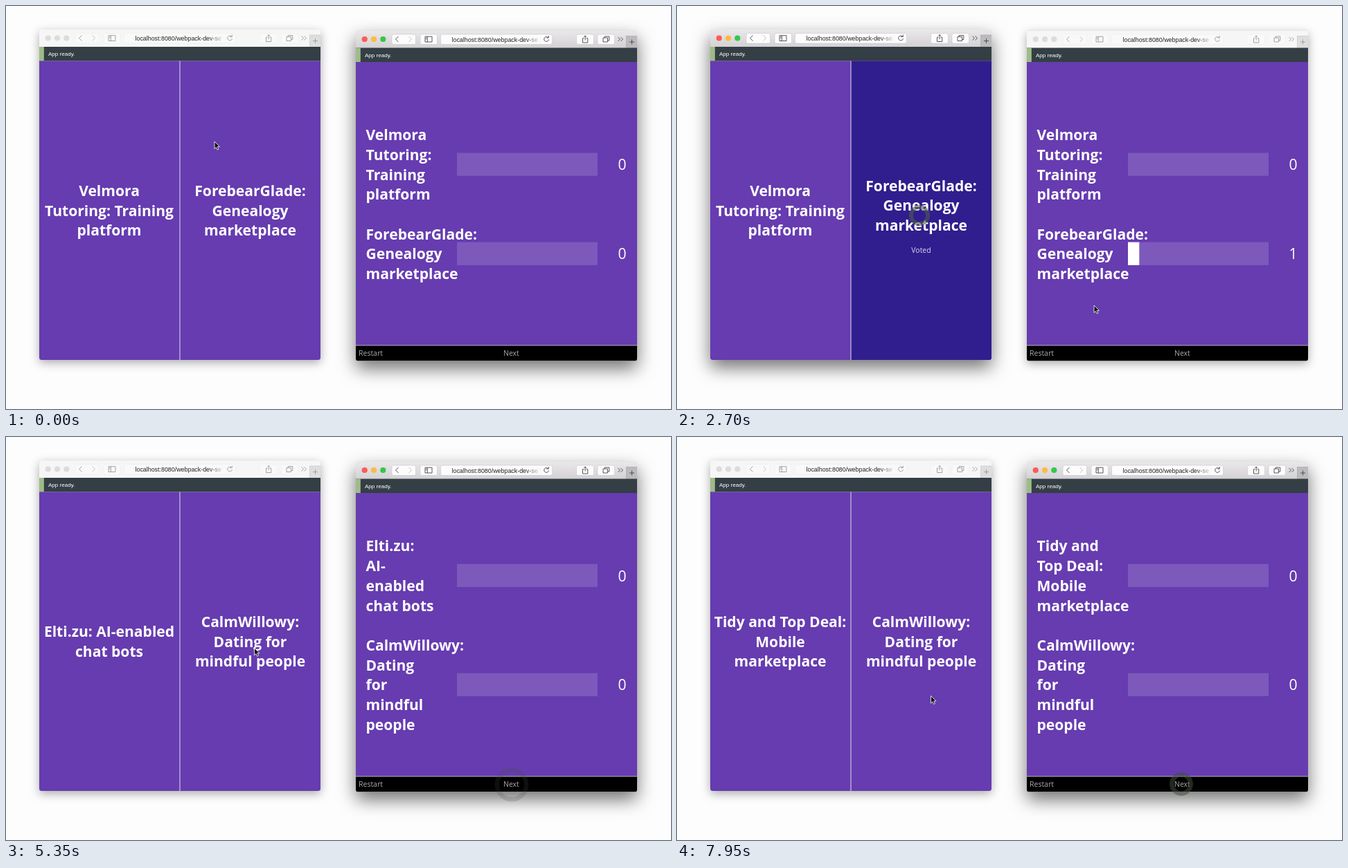
Animation, 960 px wide and 583 px high, one loop 8 s. Source, as an HTML page:

```html
<!DOCTYPE html>
<html lang="en">
<head>
<meta charset="utf-8">
<title>Live voting</title>
<style>
  html, body { margin: 0; width: 100%; height: 100%; overflow: hidden; background: #fefdfe; }
  svg { display: block; width: 100vw; height: 100vh; }
  .frame { filter: drop-shadow(0 4px 7px rgba(0,0,0,.33)); }
  .on .frame { filter: drop-shadow(0 11px 13px rgba(0,0,0,.55)); }
  .bar { fill: #f6f6f6; }
  .on .bar { fill: url(#metal); }
  .button { fill: #f9f9f9; stroke: #efefef; stroke-width: .6; }
  .on .button { fill: #fcfcfc; stroke: #c9c7c9; }
  .icon { fill: none; stroke: #999; stroke-width: .9; }
  .on .icon { stroke: #444; }
  .icon.dim, .on .icon.dim { stroke: #bbb; }
  .light { fill: #dcdcdc; }
  .on .red { fill: #fc5b57; }
  .on .yellow { fill: #fdbc40; }
  .on .green { fill: #34c84a; }
  .tab { fill: #dedede; stroke: #c4c4c4; stroke-width: .6; }
  .on .tab { fill: #bcbabc; stroke: #a5a3a5; }
  .fade { stop-color: #f9f9f9; }
  .small { font: 8.06px "Liberation Sans", Arial, sans-serif; fill: #fff; }
  .url { font: 8.9px "Liberation Sans", Arial, sans-serif; fill: #222; }
  .title { font: 700 21.07px "Open Sans", sans-serif; fill: #fff; }
  .count { font: 400 21.07px "Open Sans", sans-serif; fill: #fff; text-anchor: middle; }
  .note { font: 400 10.5px "Open Sans", sans-serif; fill: #aaa; }
  .center { text-anchor: middle; }
</style>
</head>
<body>
<svg id="stage" viewBox="0 0 960 583">
  <defs>
    <linearGradient id="metal" x2="0" y2="1"><stop stop-color="#eae8ea"/><stop offset="1" stop-color="#d3d1d3"/></linearGradient>
    <linearGradient id="fadeout"><stop class="fade" stop-opacity="0"/><stop class="fade" offset="1"/></linearGradient>
    <clipPath id="corners"><rect width="406" height="478" rx="3.5"/></clipPath>
  </defs>
  <g id="voter" transform="translate(48 34)"></g>
  <g id="board" transform="translate(505 35.5)"></g>
  <circle id="ripple0" fill="none"/><circle id="ripple1" fill="none"/>
  <path id="arrow" d="M0 0V10.6L2.4 8.4L4 12L5.9 11.2L4.3 7.6H7.5Z" fill="#111" stroke="#fff" stroke-width=".8"/>
  <path id="hand" d="M-1 1Q0-.6 1 1V5L5.4 6Q6.6 6.5 6.3 8L5.4 11.5H.4L-2.6 7.3Q-2.6 5.8-1 6.8Z" fill="#fff" stroke="#333" stroke-width=".8"/>
</svg>
<script>
const $ = id => document.getElementById(id);
const LOOP = 8000, LINE = 28.7, BASELINE = 8.1;
const PURPLE = '#663cb0', INDIGO = '#301e8e';

// Each option: lines on the voting card, then lines in the result list.
const tutoring = ['Velmora|Tutoring: Training|platform', 'Velmora|Tutoring:|Training|platform'];
const family = ['ForebearGlade:|Genealogy|marketplace', 'ForebearGlade:|Genealogy|marketplace'];
const bots = ['Elti.zu: AI-enabled|chat bots', 'Elti.zu:|AI-|enabled|chat bots'];
const dating = ['CalmWillowy:|Dating for|mindful people', 'CalmWillowy:|Dating|for|mindful|people'];
const market = ['Tidy and Top Deal:|Mobile|marketplace', 'Tidy and|Top Deal:|Mobile|marketplace'];
const rounds = [[tutoring, family], [bots, dating], [market, dating]];

const clicks = [[2100, 350, 303], [3860, 730, 503], [5560, 358, 308], [7200, 728, 502]];
const path = [
  [0, 301, 196], [1500, 351, 302], [2250, 350, 303], [2700, 602, 433], [3300, 729, 502],
  [4100, 729, 502], [4750, 366, 375], [5250, 358.5, 305], [5700, 358.5, 306],
  [6250, 678.5, 472.5], [6700, 728, 502], [7300, 728, 502], [7950, 366.5, 374.5], [8000, 365, 368]
];

const rect = (x, y, w, h, fill) => `<rect x="${x}" y="${y}" width="${w}" height="${h}" fill="${fill}"/>`;
const text = (x, y, cls, s) => `<text x="${x}" y="${y}" class="${cls}">${s}</text>`;
const button = (x, w) => `<rect class="button" x="${x}" y="5.5" width="${w}" height="14.5" rx="2.5"/>`;
const icon = (d, cls = '') => `<path class="icon ${cls}" d="${d}"/>`;
const titleLines = (x, middle, lines, cls) => lines.map((line, i) =>
  text(x, middle + (i - (lines.length - 1) / 2) * LINE + BASELINE, 'title ' + cls, line)).join('');

function chrome() {
  const lights = ['red', 'yellow', 'green'].map((c, i) =>
    `<circle class="light ${c}" cx="${12.7 + i * 13.3}" cy="12.5" r="4.1"/>`).join('');
  return '<rect class="frame" width="406" height="478" rx="3.5" fill="#ddd"/>' +
    '<g clip-path="url(#corners)"><rect class="bar" width="406" height="25.5"/>' + lights +
    button(52, 34.5) + button(93, 24.5) + button(122.5, 161) + button(318.5, 25) + button(349, 24.5) +
    icon('M61.5 8.5L57.5 12.5L61.5 16.5') + icon('M76.5 8.5L80.5 12.5L76.5 16.5', 'dim') +
    icon('M100 8.7H110V16.5H100ZM103.3 8.7V16.5M101 10.5H102.4M101 12.2H102.4') +
    text(138.5, 16, 'url', 'localhost:8080/webpack-dev-se') + rect(245, 8, 22, 11, 'url(#fadeout)') +
    icon('M278 10.6A3.4 3.4 0 1 0 278.5 13M275.2 10.5H278.3V7.5') +
    icon('M329.5 11.2H327.5V17.5H334.8V11.2H332.8M331.2 14V7.5M329.3 9.3L331.2 7.4L333.1 9.3') +
    icon('M357 10.5H363.5V16.5H357ZM359.2 10.5V8.5H365.8V14.5H363.5') +
    icon('M378.5 9.5L381.5 12.5L378.5 15.5M382.5 9.5L385.5 12.5L382.5 15.5') +
    '<rect class="tab" x="390.5" y="8" width="17" height="18"/>' + icon('M395 16.5H402M398.5 13V20', 'plus') +
    rect(0, 25, 406, 20.5, '#343e45') + rect(0, 25, 6.8, 20.5, '#9dbc86') +
    text(13, 38.3, 'small', 'App ready.') + '</g>';
}

function voterBody([left, right], voted) {
  const middle = 261.5;
  return rect(0, 45.5, 406, 432.5, PURPLE) + (voted ? rect(203, 45.5, 203, 432.5, INDIGO) : '') +
    rect(202.5, 45.5, 1, 432.5, '#e4dcf2') +
    titleLines(101, middle, left[0].split('|'), 'center') +
    titleLines(304.5, middle - (voted ? 7.2 : 0), right[0].split('|'), 'center') +
    (voted ? `<text x="304.5" y="322.5" class="note center" style="fill:#ddd9f0">Voted</text>` : '');
}

function boardBody(options, voted) {
  const rows = options.map(option => option[1].split('|'));
  const total = rows[0].length + rows[1].length + 1;
  let top = 251 - total * LINE / 2;
  let out = rect(0, 45.5, 406, 410, PURPLE);
  rows.forEach((lines, i) => {
    const votes = i && voted ? 1 : 0;
    const middle = top + lines.length * LINE / 2;
    out += rect(146, middle - 16.6, 203, 33.2, 'rgba(255,255,255,.15)') +
      (votes ? rect(146, middle - 16.6, 16.3, 33.2, '#fff') : '') +
      titleLines(14.5, middle, lines, '') +
      text(384.5, middle + BASELINE, 'count', votes);
    top += (lines.length + 1) * LINE;
  });
  return out + rect(0, 455.5, 406, 22.5, '#000') + rect(0, 455, 406, 1, '#b9b3c6') +
    text(4, 470.5, 'note', 'Restart') + text(213, 470.5, 'note', 'Next');
}

for (const id of ['voter', 'board'])
  $(id).innerHTML = chrome() + `<g clip-path="url(#corners)" id="${id}Body"></g>`;

function pointerAt(t) {
  const i = path.findIndex(p => p[0] > t);
  const [t0, x0, y0] = path[i - 1], [t1, x1, y1] = path[i];
  const u = (t - t0) / (t1 - t0), e = u * u * (3 - 2 * u);
  return [x0 + (x1 - x0) * e, y0 + (y1 - y0) * e];
}

function drawRipple(el, click, t) {
  const age = click ? t - click[0] : -1;
  const visible = age >= 0 && age < 1950;
  el.style.display = visible ? '' : 'none';
  if (!visible) return;
  const k = Math.min(1, age / 700);
  const mix = (a, b) => Math.round(a + (b - a) * k);
  el.setAttribute('cx', click[1]);
  el.setAttribute('cy', click[2]);
  el.setAttribute('r', 6 + age * .0102);
  el.setAttribute('stroke-width', 2 + 4.5 * k);
  el.setAttribute('stroke', `rgb(${mix(150, 68)},${mix(190, 80)},${mix(140, 62)})`);
  el.setAttribute('stroke-opacity', .85 * (1 - age / 1950));
}

let shown = -1;
function draw(now) {
  const t = now % LOOP;
  const done = clicks.filter(c => c[0] <= t).length;
  if (done !== shown) {
    shown = done;
    const voted = done % 2 === 1, options = rounds[done >> 1];
    $('voter').classList.toggle('on', voted);
    $('board').classList.toggle('on', !voted);
    $('voterBody').innerHTML = voterBody(options, voted);
    $('boardBody').innerHTML = boardBody(options, voted);
  }
  drawRipple($('ripple0'), clicks[done - 1], t);
  drawRipple($('ripple1'), clicks[done - 2], t);

  const [x, y] = pointerAt(t);
  const overLink = y > 494 && x > 716 && x < 743;
  for (const [id, visible] of [['hand', overLink], ['arrow', !overLink]]) {
    $(id).setAttribute('transform', `translate(${x} ${y})`);
    $(id).style.display = visible ? '' : 'none';
  }
  requestAnimationFrame(draw);
}
const start = performance.now();
const tick = draw;
draw = now => tick(Math.max(0, now - start));
draw(start);
</script>
</body>
</html>
```
